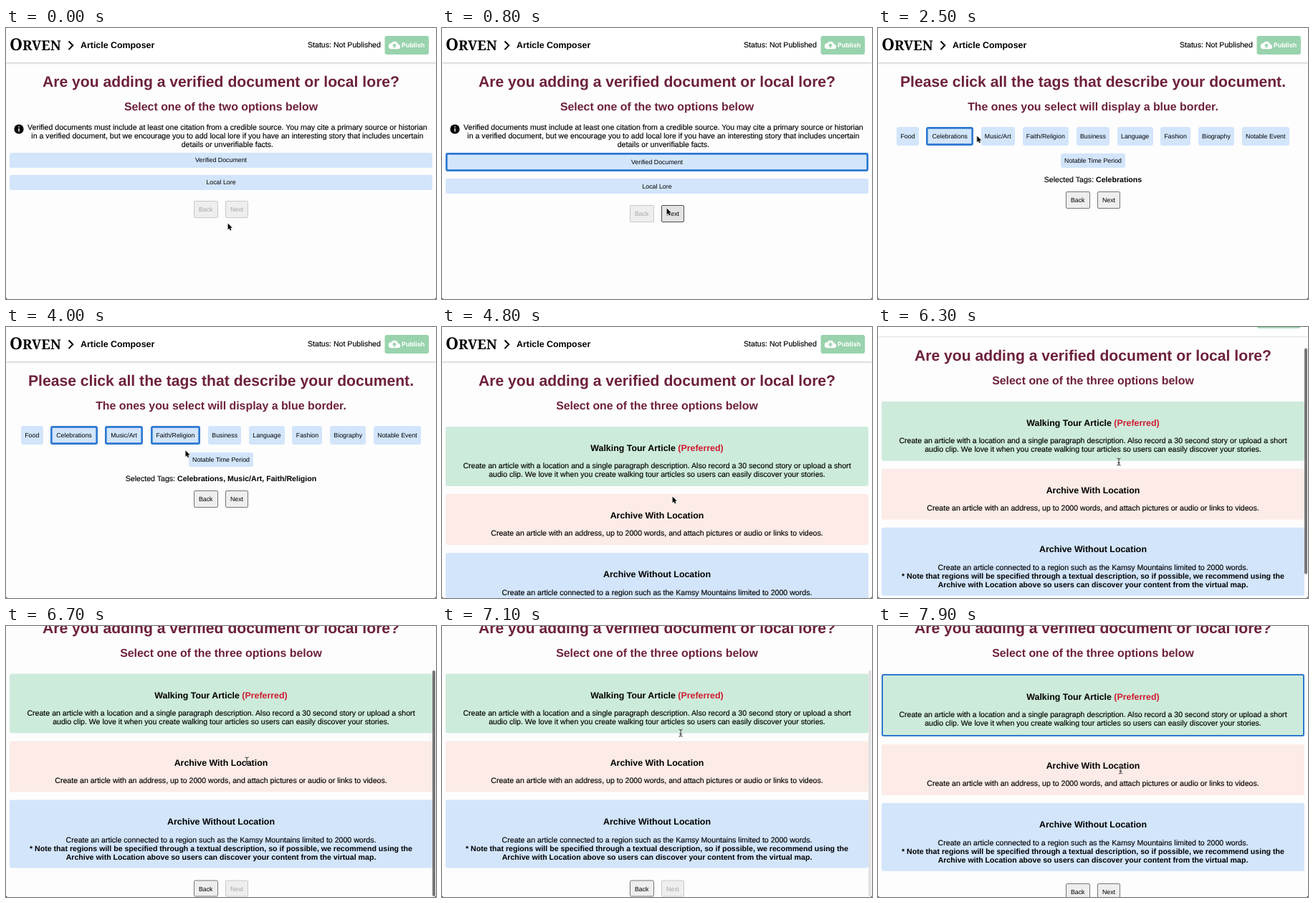
Recreate the animation shown at these times as an HTML page. Size 600 by 378 pixels, loop 8000 ms.

```html
<!DOCTYPE html>
<html lang="en">
<head>
<meta charset="utf-8">
<title>Article Composer</title>
<style>
html, body { margin: 0; width: 100%; height: 100%; overflow: hidden; background: #444; }
#stage {
  --s1: 1; --s2: 0; --s3: 0;
  --opt: 0; --a: 0; --b: 0; --c: 0; --card: 0;
  --hover: 0; --beam: 0;
  position: absolute; left: 0; top: 0; width: 600px; height: 378px; overflow: hidden;
  background: #fefdfe; color: #000; border-radius: 0 0 3px 3px;
  font: 10.6px/12px "Liberation Sans", Arial, sans-serif;
  text-rendering: geometricPrecision; text-align: center;
  animation: state 8s step-end infinite;
}
/* Clicks, page changes, hover and pointer shape */
@keyframes state {
  4.9% { --opt: 1; }
  8% { --hover: 1; }
  12.25% { --s1: 0; --s2: 1; --hover: 0; }
  29.7% { --a: 1; }
  36.2% { --b: 1; }
  46.2% { --c: 1; }
  53.5% { --hover: 1; }
  57.25% { --s2: 0; --s3: 1; --hover: 0; }
  68.5% { --beam: 1; }
  92.4% { --card: 1; }
}

.page, .scene { position: absolute; left: 0; top: 0; width: 600px; }
.page { animation: scroll 8s infinite; }
@keyframes scroll {
  0%, 75% { transform: none; animation-timing-function: ease-in; }
  78.75% { transform: translateY(-35px); animation-timing-function: ease-out; }
  83.5%, 92.4% { transform: translateY(-72.5px); }
  93%, 100% { transform: translateY(-72px); }
}
.bar {
  position: absolute; left: 594.8px; top: 0; width: 4.7px; height: 315px;
  border-radius: 2px; background: #757575; opacity: 0;
  animation: bar 8s infinite;
}
@keyframes bar {
  0%, 75% { opacity: 0; transform: translateY(1px); animation-timing-function: ease-in; }
  75.8% { opacity: 1; }
  78.75% { transform: translateY(29.5px); animation-timing-function: ease-out; }
  83.5%, 100% { transform: translateY(62px); }
  87.5% { opacity: 1; }
  90%, 100% { opacity: 0; }
}

header {
  position: absolute; left: 0; top: 0; width: 600px; height: 47.7px;
  background: #fff; box-shadow: 0 .5px 3px rgb(0 0 0 / .3);
}
header svg { position: absolute; left: 0; top: 0; }

h1, h2, h3, p { margin: 0; }
h1, h2 { position: absolute; width: 600px; white-space: nowrap; color: #6d213d; }
h1 { top: 64.2px; font-size: 21.15px; line-height: 24px; }
h2 { top: 102.1px; font-size: 15.9px; line-height: 18px; }
h3 { font-size: 12.4px; line-height: 14px; margin-bottom: 12.7px; }
h3 em { font-style: normal; color: #d01b30; }
p { -webkit-text-stroke: .15px; }
p b { -webkit-text-stroke: 0; }
.body { position: absolute; left: 5.3px; width: 589.4px; white-space: nowrap; }

.opt, .btn { font-size: 8.84px; line-height: 10px; }
.opt, .card {
  --on: 0; --w: 2.65px;
  border-radius: 3px; background: #d2e5fb;
  box-shadow: inset 0 0 0 calc(var(--on) * var(--w)) #2c78cf;
}
.opt { padding: calc(5.3px + var(--on) * var(--w)); }
.opt + .opt { margin-top: 10.6px; }
.tags { display: flex; flex-wrap: wrap; justify-content: center; gap: 10.6px; margin-bottom: 10.2px; }
.tags .opt { display: flex; align-items: center; margin: 0; }
.card {
  --w: 2px; margin-bottom: 10.6px;
  padding: calc(23.1px + var(--on) * var(--w)) 0 calc(9.8px + var(--on) * var(--w));
}

.nav { display: flex; justify-content: center; gap: 10.2px; }
.btn {
  --on: 1; --hot: 0;
  --edge: calc(118 - 40 * var(--hot)); --face: calc(238 - 11 * var(--hot)); --ink: calc(.3 + .7 * var(--on));
  box-sizing: border-box; height: 23.8px; padding: 5.9px 6.1px;
  border: 1px solid rgb(var(--edge) var(--edge) var(--edge) / var(--ink));
  border-radius: 2px; color: rgb(0 0 0 / var(--ink));
  background: rgb(var(--face) var(--face) var(--face));
}

.picked { position: relative; height: 12px; margin-bottom: 10.6px; }
.picked span { position: absolute; left: 0; width: 100%; }

.cursor { position: absolute; left: 0; top: 0; overflow: visible; animation: move 8s ease-in-out infinite; }
@keyframes move {
  0%, 1.2% { transform: translate(310px, 272px); }
  4%, 5.4% { transform: translate(306px, 187px); }
  8.5%, 21% { transform: translate(314px, 251px); }
  23% { transform: translate(313px, 236px); }
  27.5%, 30% { transform: translate(108px, 150px); }
  31.2% { transform: translate(138.5px, 150px); }
  33.5%, 38% { transform: translate(163px, 151px); }
  43%, 48% { transform: translate(229px, 152px); }
  54%, 65% { transform: translate(322px, 236px); }
  71%, 86% { transform: translate(336px, 188px); }
  91%, 95.5% { transform: translate(331px, 122px); }
  98.5%, 100% { transform: translate(338.5px, 201px); }
}
</style>
</head>
<body>
<div id="stage">
  <div class="page">
    <header>
      <svg width="600" height="48" font-weight="700">
        <text x="5" y="30.5" font-family="Noto Serif, serif" font-size="23">O<tspan font-size="19">RVEN</tspan></text>
        <path d="M87.5 18.5l5.8 5.8-5.8 5.8" fill="none" stroke="#000" stroke-width="2"/>
        <text x="104" y="28.3" font-size="12.4">Article Composer</text>
        <text x="421" y="27.3" font-size="10.6" font-weight="400" stroke="#000" stroke-width=".15">Status: Not Published</text>
        <rect x="528.5" y="11" width="61.5" height="26" rx="3" fill="#99d3ad"/>
        <g transform="translate(534 16) scale(.667)">
          <path d="M6 20a6 6 0 0 1-.65-12 7.5 7.5 0 0 1 14 2 5 5 0 0 1-.35 10z" fill="#fff"/>
          <path d="M12 8l5 5h-3v4h-4v-4H7z" fill="#99d3ad"/>
        </g>
        <text x="552" y="27.2" font-family="Inter, sans-serif" font-size="8.9" fill="#fff">Publish</text>
      </svg>
    </header>

    <section class="scene" style="opacity:var(--s1)">
      <h1>Are you adding a verified document or local lore?</h1>
      <h2>Select one of the two options below</h2>
      <svg style="position:absolute;left:11px;top:134px" width="14" height="14">
        <circle cx="7" cy="7" r="6.6"/>
        <path d="M6.3 3.2h1.5v1.5H6.3zM6.3 6h1.5v4.4H6.3z" fill="#fff"/>
      </svg>
      <p class="body" style="top:133px;left:14.2px">Verified documents must include at least one citation from a credible source. You may cite a primary source or historian<br>in a verified document, but we encourage you to add local lore if you have an interesting story that includes uncertain<br>details or unverifiable facts.</p>
      <div class="body" style="top:174px">
        <div class="opt" style="--on:var(--opt)">Verified Document</div>
        <div class="opt">Local Lore</div>
        <div class="nav" style="margin-top:15.7px">
          <div class="btn" style="--on:0">Back</div>
          <div class="btn" style="--on:var(--opt);--hot:var(--hover)">Next</div>
        </div>
      </div>
    </section>

    <section class="scene" style="opacity:var(--s2)">
      <h1>Please click all the tags that describe your document.</h1>
      <h2>The ones you select will display a blue border.</h2>
      <div class="body" style="top:138.4px">
        <div class="tags">
          <div class="opt">Food</div>
          <div class="opt" style="--on:var(--a)">Celebrations</div>
          <div class="opt" style="--on:var(--b)">Music/Art</div>
          <div class="opt" style="--on:var(--c)">Faith/Religion</div>
          <div class="opt">Business</div>
          <div class="opt">Language</div>
          <div class="opt">Fashion</div>
          <div class="opt">Biography</div>
          <div class="opt">Notable Event</div>
          <div class="opt">Notable Time Period</div>
        </div>
        <p class="picked">
          <span style="opacity:calc(1 - var(--a))">Selected Tags:</span>
          <span style="opacity:calc(var(--a) - var(--b))">Selected Tags: <b>Celebrations</b></span>
          <span style="opacity:calc(var(--b) - var(--c))">Selected Tags: <b>Celebrations, Music/Art</b></span>
          <span style="opacity:var(--c)">Selected Tags: <b>Celebrations, Music/Art, Faith/Religion</b></span>
        </p>
        <div class="nav">
          <div class="btn">Back</div>
          <div class="btn" style="--on:var(--a);--hot:var(--hover)">Next</div>
        </div>
      </div>
    </section>

    <section class="scene" style="opacity:var(--s3)">
      <h1>Are you adding a verified document or local lore?</h1>
      <h2>Select one of the three options below</h2>
      <div class="body" style="top:138.5px">
        <div class="card" style="--on:var(--card);background:#cdebdb">
          <h3>Walking Tour Article <em>(Preferred)</em></h3>
          <p>Create an article with a location and a single paragraph description. Also record a 30 second story or upload a short<br>audio clip. We love it when you create walking tour articles so users can easily discover your stories.</p>
        </div>
        <div class="card" style="background:#fcebe6">
          <h3>Archive With Location</h3>
          <p>Create an article with an address, up to 2000 words, and attach pictures or audio or links to videos.</p>
        </div>
        <div class="card">
          <h3>Archive Without Location</h3>
          <p>Create an article connected to a region such as the Kamsy Mountains limited to 2000 words.<br><b>* Note that regions will be specified through a textual description, so if possible, we recommend using the<br>Archive with Location above so users can discover your content from the virtual map.</b></p>
        </div>
        <div class="nav" style="margin-top:16.2px">
          <div class="btn">Back</div>
          <div class="btn" style="--on:var(--card)">Next</div>
        </div>
      </div>
    </section>
  </div>

  <div class="bar"></div>

  <svg class="cursor" width="1" height="1">
    <defs>
      <path id="ibeam" d="M-2.2-5Q0-5 0-3.6V3.6Q0 5-2.2 5M2.2-5Q0-5 0-3.6M0 3.6Q0 5 2.2 5M-1.3 1.4H1.3"/>
    </defs>
    <path style="opacity:calc(1 - var(--beam))" d="M-.4.4V9.2L1.6 7.4 2.9 10.4 4.4 9.8 3.1 6.8H5.8Z" stroke="#fff" stroke-width="1.2" paint-order="stroke"/>
    <g style="opacity:var(--beam)" fill="none" stroke-linecap="round">
      <use href="#ibeam" stroke="#fff" stroke-width="2" opacity=".6"/>
      <use href="#ibeam" stroke="#222"/>
    </g>
  </svg>
</div>
</body>
</html>
```
